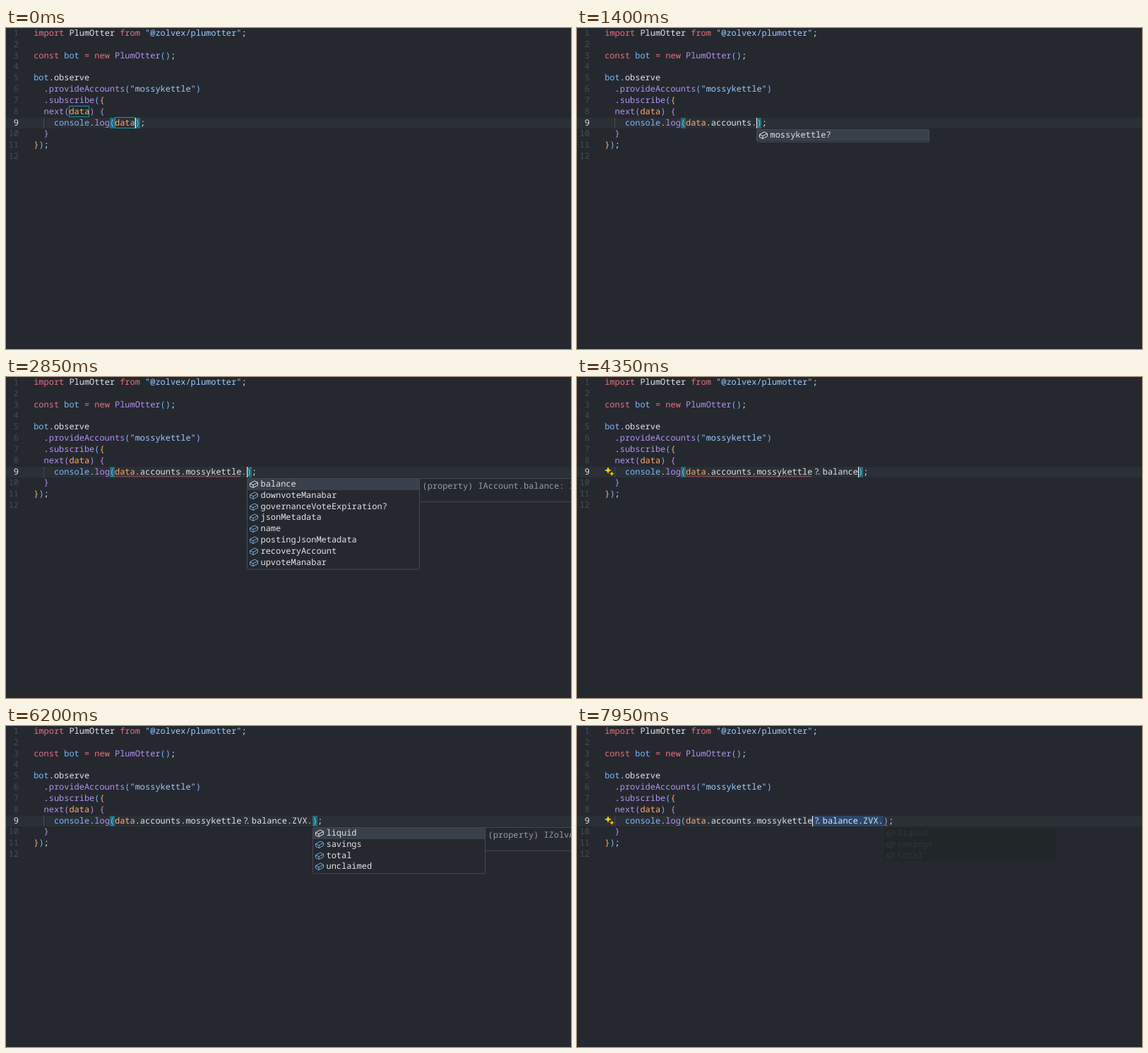
An HTML page that plays this animation: 800 px wide and 454 px high, repeating every 8 s.

```html
<!DOCTYPE html>
<html lang="en">
<head>
<meta charset="utf-8">
<title>Code editor</title>
<style>
  html, body { margin: 0; width: 100%; height: 100%; overflow: hidden; background: #25282f; }
  svg { display: block; width: 800px; height: 454px; }
  text {
    font: 11.96px "Noto Sans Mono", "DejaVu Sans Mono", monospace;
    white-space: pre; text-rendering: geometricPrecision; font-variant-ligatures: none;
  }
</style>
</head>
<body>
<svg viewBox="0 0 800 454"><g id="stage"></g></svg>
<script>
const LOOP = 8000, CHAR = 7.175, LEFT = 39.2, ROW = 15.82;
const PAGE = '#25282f', DARK = '#1f2428', BORDER = '#444a53';
const stage = document.getElementById('stage');

// First letter of each token picks its colour.
const COLORS = {
  k: '#ea6f7d', w: '#e1e4e8', s: '#9ecbff', p: '#b392f0',
  b: '#79b8ff', o: '#ffab70', n: '#444d56', d: '#959da5', g: '#30363b'
};

const CODE = [
  'kimport|w PlumOtter |kfrom|s "@zolvex/plumotter"|w;',
  '',
  'kconst|b bot |k= new|p PlumOtter|b()|w;',
  '',
  'bbot|w.observe',
  'w  .|pprovideAccounts|b(|s"mossykettle"|b)',
  'w  .|psubscribe|b(|o{',
  'p  next(|odata|p) {',
  '',
  'p  }',
  'o}|b)|w;',
  ''
];

// Expression inside the call; blink is when the caret restarts.
const EDITS = [
  { at: 0, text: 'data' },
  { at: 30, text: 'data.' },
  { at: 880, text: 'data.accounts' },
  { at: 1350, text: 'data.accounts.' },
  { at: 1700, text: 'data.accounts.mossykettle', blink: 1550 },
  { at: 2450, text: 'data.accounts.mossykettle.', blink: 2500 },
  { at: 4000, text: 'data.accounts.mossykettle?.balance' },
  { at: 4850, text: 'data.accounts.mossykettle?.balance.' },
  { at: 5550, text: 'data.accounts.mossykettle?.balance.ZVX' },
  { at: 5700, text: 'data.accounts.mossykettle?.balance.ZVX.' }
];

const POPUPS = [
  { from: 150, to: 880, col: 21, detailAt: 300, items: ['accounts'],
    detail: ['(property) accounts: Partial<Record<"mossykettle",', 'IAccount>>'] },
  { from: 1400, to: 1700, col: 30, detailAt: 1500, items: ['mossykettle?'],
    detail: ['(property) mossykettle?: IAccount'] },
  { from: 2500, to: 4000, col: 42, detailAt: 2650,
    items: ['balance', 'downvoteManabar', 'governanceVoteExpiration?', 'jsonMetadata',
            'name', 'postingJsonMetadata', 'recoveryAccount', 'upvoteManabar'],
    detail: ['(property) IAccount.balance: IAccountBalance'] },
  { from: 4950, to: 5550, col: 51, detailAt: 5050, items: ['ZVX', 'ZOLV', 'ZP'],
    detail: ['(property) IAccountBalance.ZVX'] },
  { from: 5800, to: 7450, col: 55, detailAt: 5900,
    items: ['liquid', 'savings', 'total', 'unclaimed'], moves: [6550, 6650, 6750],
    detail: ['(property) IZolvAsset.liquid'] }
];

const SELECTION = [[7650, 51], [7800, 43], [7900, 41]];

const colX = col => LEFT + col * CHAR;
const pixelX = col => Math.round(colX(col));
const baseline = row => Math.round(11 + (row - 1) * ROW);
const itemBaseline = i => Math.round(155 + i * ROW);
const within = (t, a, b) => t >= a && t < b;
const escape = s => s.replace(/&/g, '&amp;').replace(/</g, '&lt;');
const rect = (x, y, w, h, fill, extra = '') =>
  `<rect x="${x}" y="${y}" width="${w}" height="${h}" fill="${fill}" ${extra}/>`;
const text = (x, y, color, s, extra = '') =>
  `<text x="${x}" y="${y}" fill="${COLORS[color]}" ${extra}>${escape(s)}</text>`;
const path = (d, stroke, extra = '') =>
  `<path d="${d}" fill="none" stroke="${stroke}" ${extra}/>`;

function tokens(row, line, col = 0) {
  return line.split('|').filter(Boolean).map(token => {
    const s = token.slice(1);
    const out = text(colX(col), baseline(row), token[0], s);
    col += s.length;
    return out;
  }).join('');
}

const STATIC_CODE = CODE.map((line, i) => {
  const row = i + 1;
  return text(18, baseline(row), row === 9 ? 'w' : 'n', String(row), 'text-anchor="end"')
    + tokens(row, line);
}).join('');

function squiggle(from, to) {
  let d = `M${from} 141.5`;
  for (let x = from + 2, up = true; x <= to; x += 2, up = !up) d += `L${x} ${up ? 139.5 : 141.5}`;
  return path(d, '#d4606f', 'stroke-width=".9"');
}

function star(x, y, r) {
  const q = r * 0.28;
  return `<path fill="#ffcc00" d="M${x} ${y - r}L${x + q} ${y - q}L${x + r} ${y}L${x + q} ${y + q}`
    + `L${x} ${y + r}L${x - q} ${y + q}L${x - r} ${y}L${x - q} ${y - q}Z"/>`;
}

function cube(x, y, color) {
  return path(`M${x - 5.5} ${y - 1}L${x + 1} ${y - 4.5}L${x + 5.5} ${y - 2.2}V${y + 1.6}`
    + `L${x - 1} ${y + 5}L${x - 5.5} ${y + 2.8}ZM${x - 5.5} ${y - 1}L${x - 1} ${y + 1.2}`
    + `L${x + 5.5} ${y - 2.2}M${x - 1} ${y + 1.2}V${y + 5}`, color, 'stroke-linejoin="round"');
}

function listItem(x, i, label, color, iconColor) {
  const y = itemBaseline(i);
  return cube(x + 9.5, y - 3.5, iconColor) + text(x + 19, y, color, label);
}

function popup(p, t) {
  const x = pixelX(p.col) + 0.5, top = 143.5;
  const selected = (p.moves || []).filter(at => t >= at).length;
  let out = '';
  if (t >= p.detailAt) {
    const height = p.detail.length > 1 ? 39 : 33;
    out += rect(x + 244, top, 620, height, PAGE, `stroke="${BORDER}"`);
    p.detail.forEach((s, i) => out += text(x + 248, 158 + i * ROW, 'd', s));
  }
  // The list darkens once the selection starts moving.
  out += rect(x, top, 244, p.items.length * ROW + 2, selected ? DARK : PAGE,
    `stroke="${BORDER}" rx="1.5"`);
  p.items.forEach((item, i) => {
    const active = i === selected;
    if (active) out += rect(x + 0.5, itemBaseline(i) - 11, 243, 16, '#39404a');
    out += listItem(x, i, item, 'w', active ? COLORS.w : '#75add8');
  });
  return out;
}

// Faint remains of the last list after it closes.
function afterglow(p) {
  const x = pixelX(p.col);
  return rect(x + 1, 144, 243, 47, '#212629')
    + p.items.slice(0, 3).map((item, i) => listItem(x + 0.5, i, item, 'g', COLORS.g)).join('');
}

function expression(s) {
  const q = s.indexOf('?.'), y = baseline(9);
  const out = text(colX(16), y, 'o', 'data');
  if (q < 0) return out + text(colX(20), y, 'w', s.slice(4));
  // The "?." pair sits tight together.
  return out + text(colX(20), y, 'w', s.slice(4, q))
    + text(colX(16 + q) + 2.4, y, 'w', '?')
    + text(colX(17 + q) - 1.5, y, 'w', '.')
    + text(colX(18 + q), y, 'w', s.slice(q + 2));
}

function scene(t) {
  const edit = EDITS.filter(e => t >= e.at).pop();
  const end = 16 + edit.text.length;
  const pick = SELECTION.filter(([at]) => t >= at).pop();
  const caret = pick ? pick[1] : end;
  const blinkStart = edit.blink ?? edit.at;
  const caretOn = pick || Math.floor((t - blinkStart) / 500) % 2 === 0;

  let out = rect(0, 127, 800, 15, '#2b2f36') + rect(53, 127, 1, 15, BORDER);
  if (pick) {
    out += rect(colX(caret), 127, (end - caret) * CHAR, 15, '#2c4568');
  } else {
    for (const col of [15, end]) out += rect(pixelX(col), 127, 7, 15, '#17e5e6', 'fill-opacity=".32"');
  }
  if (t < 30) {
    for (const [col, y] of [[7, 110.5], [16, 126.5]])
      out += rect(pixelX(col) + 0.5, y, 28, 15, 'none', 'stroke="#1d999b"');
  }

  out += STATIC_CODE + tokens(9, 'b    console|w.|plog|b(') + expression(edit.text)
    + tokens(9, 'b)|w;', end);
  if (within(t, 2800, 4750)) out += squiggle(154, 333);
  if (t >= 6450) out += squiggle(434, 441);
  if (within(t, 3200, 4750) || t >= 6500) out += star(44, 132, 5) + star(49.3, 136.8, 3.4);

  const open = POPUPS.find(p => within(t, p.from, p.to));
  if (open) out += popup(open, t);
  else if (t >= 7450) out += afterglow(POPUPS[POPUPS.length - 1]);
  if (caretOn) out += rect(pixelX(caret), 127, 1, 15, '#f4f6f8');
  return out;
}

let shown = '';
function frame() {
  const next = scene(performance.now() % LOOP);
  if (next !== shown) stage.innerHTML = shown = next;
  requestAnimationFrame(frame);
}
frame();
</script>
</body>
</html>
```
